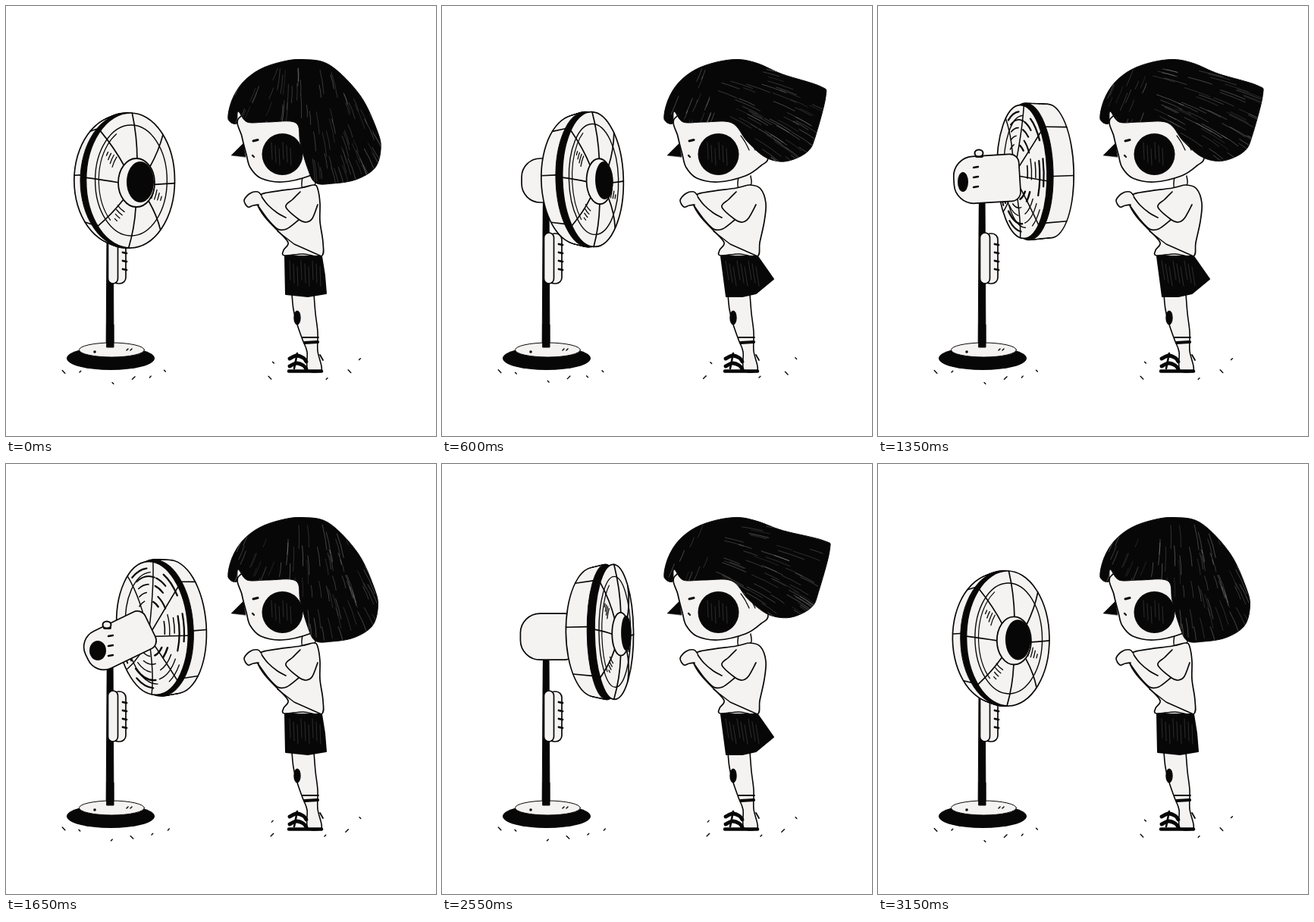
Recreate the animation shown at these times as an HTML page with a canvas. Size 567 by 567 pixels, loop 3.3 s.

```html
<!DOCTYPE html>
<html lang="en">
<head>
<meta charset="utf-8">
<title>Fan breeze</title>
<style>
html, body { margin: 0; width: 100%; height: 100%; overflow: hidden; background: #fff; }
canvas { display: block; }
</style>
</head>
<body>
<canvas id="c" width="567" height="567"></canvas>
<script>
const g = document.getElementById('c').getContext('2d');
const INK = '#080707', PAPER = '#f5f3f2', STEP = 150, STEPS = 22;
g.lineCap = g.lineJoin = 'round';

const lerp = (a, b, t) => a + (b - a) * t;
const ease = t => t * t * t * (t * (t * 6 - 15) + 10);
const pairs = a => a.reduce((r, v, i) => (i % 2 ? r[r.length - 1].push(v) : r.push([v]), r), []);

function rng(seed) {
  return () => (seed = (seed * 16807) % 2147483647) / 2147483647;
}

function paint(fill, lw, ink = INK) {
  if (fill) { g.fillStyle = fill; g.fill(); }
  if (lw) { g.strokeStyle = ink; g.lineWidth = lw; g.stroke(); }
}

function oval(x, y, rx, ry, fill, lw) {
  g.beginPath();
  g.ellipse(x, y, rx, ry, 0, 0, 7);
  paint(fill, lw);
}

function arc(x, y, rx, ry, from, to, lw) {
  g.beginPath();
  g.ellipse(x, y, rx, ry, 0, from, to);
  paint(null, lw);
}

function box(x, y, w, h, r, fill, lw) {
  g.beginPath();
  g.roundRect(x, y, w, h, r);
  paint(fill, lw);
}

function poly(pts, fill, lw, closed) {
  g.beginPath();
  pairs(pts).forEach(p => g.lineTo(p[0], p[1]));
  if (closed) g.closePath();
  paint(fill, lw);
}

// Smooth path through the points
function trace(p, closed) {
  const n = p.length, at = i => closed ? p[(i + n) % n] : p[Math.max(0, Math.min(n - 1, i))];
  g.beginPath();
  g.moveTo(...p[0]);
  for (let i = 0; i < (closed ? n : n - 1); i++) {
    const a = at(i - 1), b = at(i), c = at(i + 1), d = at(i + 2);
    g.bezierCurveTo(b[0] + (c[0] - a[0]) / 6, b[1] + (c[1] - a[1]) / 6,
      c[0] - (d[0] - b[0]) / 6, c[1] - (d[1] - b[1]) / 6, c[0], c[1]);
  }
}

function curve(pts, fill, lw, closed) {
  trace(pairs(pts), closed);
  paint(fill, lw);
}

// ---- fan: seen from the front while n <= 8, from behind after that
function fanPose(n) {
  const back = n > 8, t = back ? (n - 9) / 2 : ease(n / 8);
  const m = (a, b) => lerp(a, b, t);
  if (back) {
    return {
      back, cy: m(218.5, 216.5), tilt: m(-.03, -.07),
      shell: { x: m(226, 220), rx: m(32, 44), ry: 88 },
      rim: { x: m(197, 200), rx: m(34, 47), ry: 90 },
      face: { x: m(190, 193), rx: m(33, 47), ry: 88 },
      motor: { x: 131, y: m(229, 243), r: m(31, 27), len: m(56, 66), turn: m(-.06, -.45), dot: m(7, 11), shift: m(-19, -10) }
    };
  }
  return {
    back, cy: 230 - 12 * t ** 3, tilt: -.12 * t * (1 - t),
    shell: { x: m(150, 206), rx: m(60, 34), ry: 85 },
    rim: { x: m(159, 223), rx: m(61, 21), ry: 89 },
    face: { x: m(164, 234), rx: m(58.5, 22), ry: 89 },
    ring: { x: m(172, 243), rx: m(24, 10), ry: m(32, 28) },
    hub: { x: m(177, 250.5), rx: m(18, 5.5), ry: m(27, 23) },
    motor: { x: Math.max(134, 158 - 50 * t), y: m(233, 227), r: m(27, 31), len: 40, turn: 0, dot: t > .9 ? 4 : 0, shift: -27 }
  };
}

function drawStand() {
  poly([133, 255, 141, 255, 142, 451, 132.5, 451], INK, 1, true);
  oval(138, 464.5, 58, 15.5, INK);
  oval(139.5, 453.5, 43, 9.5, PAPER, 1);
  poly([132.5, 420, 142, 420, 142, 450, 133, 450], INK, 1, true);
  oval(117, 456, 1.8, 1.8, INK);
  for (const x of [159, 164]) poly([x, 454, x + 2, 452], null, 1.5);
  box(140, 300, 18, 66, 8, PAPER, 1.7);
  box(134.5, 299, 13, 67, 6.5, PAPER, 1.7);
  for (let y = 314; y < 355; y += 11) poly([154, y, 159, y + 1], null, 2.8);
}

function drawMotor({ x, y, r, len, turn, dot, shift }) {
  g.save();
  g.translate(x, y);
  g.rotate(turn);
  box(-r, -r, r + len, 2 * r, [r * .85, 12, 12, r * .85], PAPER, 1.7);
  g.restore();
  if (!dot) return;
  oval(x + shift, y + 3, dot, 13, INK);
  for (const s of [-16, -3, 10]) poly([x + shift + 14, y + s, x + shift + 20, y + s - 1], null, 2.4);
  poly([x - 1, y - r, x + 6, y - r], null, 4);
  oval(x + 2, y - r - 4, 5.5, 4.5, PAPER, 2);
}

// Solid swept between two ellipses
function sweep(a, b, cy) {
  for (const [color, grow] of [[INK, 1], [PAPER, -.7]])
    for (let t = 0; t <= 1; t += .1)
      oval(lerp(a.x, b.x, t), cy, lerp(a.rx, b.rx, t) + grow, lerp(a.ry, b.ry, t) + grow, color);
}

function drawGrille({ cy, face, motor }) {
  const rnd = rng(77), mx = motor.x + motor.len * .85, my = lerp(motor.y, cy, .6);
  for (let i = 0; i < 8; i++) {
    const a = i * Math.PI / 4 + .15, ex = face.x + face.rx * Math.cos(a), ey = cy + face.ry * Math.sin(a);
    g.beginPath();
    g.moveTo(mx, my);
    g.quadraticCurveTo((mx + ex) / 2 + 5, (my + ey) / 2 + (ey - my) * .12, ex, ey);
    paint(null, 1.5);
  }
  for (let s = .42; s < .95; s += .12) {
    const x = lerp(mx, face.x, s);
    for (let a = -2.2; a < 2.4; a += .9) {
      const from = a + rnd() * .3;
      arc(x, cy, face.rx * s, face.ry * s, from, from + .35 + rnd() * .4, 1.3 + rnd() * 1.2);
    }
  }
  arc(face.x + 3, cy, face.rx * .82, face.ry * .84, 1.6, 4.7, 1.4);
}

function drawFront({ cy, face, ring, hub }) {
  const dx = ring.x - face.x, x = face.x + dx * .12;
  arc(x, cy, face.rx * .81, face.ry * .82, 0, 7, 1.4);
  arc(x + 3, cy, face.rx * .78, face.ry * .79, 2.3, 4.2, 1.2);
  for (let i = 0; i < 4; i++) {
    const s = .5 + i * .065;
    for (const a of [.2, 1.95, 3.55])
      arc(x + 2, cy, face.rx * s, face.ry * s, a + i * .05, a + .36 - i * .04, 1.3);
  }
  for (let i = 0; i < 8; i++) {
    const a = i * Math.PI / 4 + .04, c = Math.cos(a), s = Math.sin(a);
    const sx = ring.x + ring.rx * c, sy = 234 + (cy - 230) + ring.ry * s;
    const ex = face.x + face.rx * c, ey = cy + face.ry * s;
    g.beginPath();
    g.moveTo(sx, sy);
    g.quadraticCurveTo((sx + ex) / 2 + dx * .4, (sy + ey) / 2, ex, ey);
    paint(null, 1.7);
  }
  oval(ring.x, cy + 3, ring.rx, ring.ry, PAPER, 1.8);
  oval(hub.x, cy + 2, hub.rx, hub.ry, INK);
}

function drawHead(p) {
  const { cy, shell, rim, face } = p, side = p.back ? 1 : -1;
  g.save();
  g.translate(face.x, cy);
  g.rotate(p.tilt);
  g.translate(-face.x, -cy);
  sweep(shell, rim, cy);
  for (let i = 0; i < 8; i++) {
    const a = i * Math.PI / 4 + .08, c = Math.cos(a), s = Math.sin(a);
    if (c * side > .2)
      poly([rim.x + rim.rx * c, cy + rim.ry * s, shell.x + shell.rx * c, cy + shell.ry * s], null, 1.6);
  }
  oval(rim.x, cy, rim.rx, rim.ry, INK, 1);
  oval(face.x, cy, face.rx, face.ry, PAPER, 1.7);
  if (p.back) drawGrille(p); else drawFront(p);
  g.restore();
}

function drawFan(k) {
  const p = fanPose(k > 11 ? 23 - k : k);
  drawStand();
  if (!p.back) drawMotor(p.motor);
  drawHead(p);
  if (p.back) drawMotor(p.motor);
}

// ---- girl: each pose is [wind strength, reach of the hair]
const POSES = { a: [0, 1], b: [0, .99], c: [0, .96], t: [.75, 1.07], r: [1, 1], p: [1.02, 1.01], q: [1.08, 1.04] };
const ORDER = 'abctrpqprptcbatrpqprtc';

const CROWN = [293, 149, 298, 124, 312, 101, 334, 84, 362, 74, 391, 70.5];
const CALM = [427, 78, 467, 118, 490, 166, 494, 190, 486, 214, 461, 229, 431, 234, 408, 233, 397, 212, 388, 180];
const BLOWN = [417, 76, 449, 90, 499, 106, 506, 119, 492, 173, 483, 191, 464, 202, 445, 205, 424, 198, 402, 178];
const FRINGE = [382, 154, 345, 153, 318, 153, 306, 139, 304, 155];

function drawHair(wind, reach, seed) {
  const lock = CALM.map((v, i) => lerp(v, BLOWN[i], wind));
  const pts = pairs([...CROWN, ...lock, ...FRINGE]).map(([x, y]) => [x > 400 ? 400 + (x - 400) * reach : x, y]);
  trace(pts, true);
  paint(INK, 1);
  g.save();
  g.clip();
  const rnd = rng(seed * 977 + 31);
  for (let i = 0; i < 110; i++) {
    const x = 305 + rnd() * 185, y = 80 + rnd() * 135, len = .6 + rnd() * .8;
    const left = x < 360;
    const dx = left ? -7 : lerp((x - 385) * .13, 25, wind);
    const dy = left ? 17 : lerp(24, 6 + (y - 80) * .12, wind);
    g.beginPath();
    g.moveTo(x, y);
    g.quadraticCurveTo(x + dx * len * .5 + 1, y + dy * len * .45, x + dx * len, y + dy * len);
    paint(null, .7, `rgba(255,255,255,${.15 + rnd() * .25})`);
  }
  g.restore();
}

function hatch(x, y, n, lean, height) {
  for (let i = 0; i < n; i++) {
    const sx = x + i * 5, sy = y + i % 3 * 4;
    g.beginPath();
    g.moveTo(sx, sy);
    g.lineTo(sx + lean, sy + height);
    paint(null, .7, 'rgba(255,255,255,.22)');
  }
}

function drawLegs() {
  curve([377, 380, 379, 400, 384, 420, 391, 440, 397, 456, 398, 480, 416, 480, 411, 455, 411, 430,
    408, 405, 406, 380], PAPER, 1.6);
  oval(384, 411, 4.7, 9.5, INK);
  poly([391, 437, 412, 437], null, 1.8);
  poly([394, 444, 411, 443], null, 4.2);
  poly([373, 481.5, 416, 481.5], null, 4.5);
  for (const y of [465, 475]) curve([374, y, 383, y - 4, 392, y - 1, 396, y + 4], null, 4.8);
  poly([384, 458, 380, 478], null, 2.6);
  poly([414, 460, 418, 467], null, 1.8);
}

function drawBody(wind) {
  const q = (a, b) => lerp(a, b, Math.min(wind, 1));
  curve([391, 224, 391, 240, 407, 236, 407, 224], PAPER, 1.5);
  curve([332, 262, 342, 279, 358, 296, 372, 312, 366, 322, 367, 329, 392, 327, 416, 330,
    q(418, 419), 312, q(414, 425), 284, q(414, 427), 260, q(411, 420), 241, 406, 236, 388, 240, 337, 248], PAPER, 1.7, true);
  poly([358, 297, 380, 314, 416, 330], null, 1.5);
  curve([336, 250, 345, 262, 358, 273, 369, 279], null, 1.7);
  curve([388, 245, 378, 255, 369, 265, 387, 282, 396, 285, 404, 280, q(411, 414), 262], null, 1.7);
  curve([332, 263, 345, 281, 358, 294, 370, 294, 386, 282], null, 1.7);
  curve([333, 262, 326, 263, 319, 265, 314, 256, 322, 247, 332, 245, 337, 250], PAPER, 1.7);
  poly([368, 330, 416, 330, q(420, 437), q(355, 360), q(422, 414), q(379, 379), q(398, 396), 383,
    q(369, 375), q(380, 383)], INK, 2, true);
  hatch(374, 336, 9, q(1, 4), 25);
}

function drawFace(wind) {
  curve([307, 148, 311, 172, 317, 196, 322, 213, 336, 227, 364, 232, 400, 224, 420, 211, 430, 198,
    415, 160, 345, 135], PAPER, 1.7, true);
  poly([297, 197, 313, 181, 316, 199], INK, .5, true);
  poly([326, 178, 332, 176.5], null, 3);
  poly([325, 197, 327, 199], null, 2.2);
  oval(364.5, 195.5, 27, 27.5, INK);
  hatch(350, 180, 6, 1, 22);
  if (wind) for (const x of [394, 402]) curve([x, 171, x + 6, 180, x + 11, 190], null, 1.3);
}

function drawGirl(k) {
  const type = ORDER[k], [wind, reach] = POSES[type];
  drawLegs();
  drawBody(wind);
  drawFace(wind);
  drawHair(wind, reach, type.charCodeAt(0));
}

// ---- ground specks, shaking in a cycle of three
const SPECKS = [79, 481, 99, 483, 141, 496, 168, 491, 193, 488, 212, 481, 349, 490, 353, 471, 421, 490, 452, 483, 468, 466];

function drawSpecks(v) {
  const rnd = rng(v * 401 + 53);
  pairs(SPECKS).forEach(([x, y], i) => {
    const sx = x + rnd() * 6 - 3, sy = y + rnd() * 3 - 1.5, n = i % 3 ? .9 : 1.8;
    const s = rnd() < .5 ? n : -n;
    poly([sx - n, sy - s, sx + n, sy + s], null, 1.4);
  });
}

function draw(k) {
  g.fillStyle = '#fff';
  g.fillRect(0, 0, 567, 567);
  drawSpecks(k % 3);
  drawFan(k);
  drawGirl(k);
}

const start = performance.now();
let shown = -1;
function tick() {
  const k = Math.floor((performance.now() - start) / STEP) % STEPS;
  if (k !== shown) draw(shown = k);
  requestAnimationFrame(tick);
}
tick();
</script>
</body>
</html>
```
